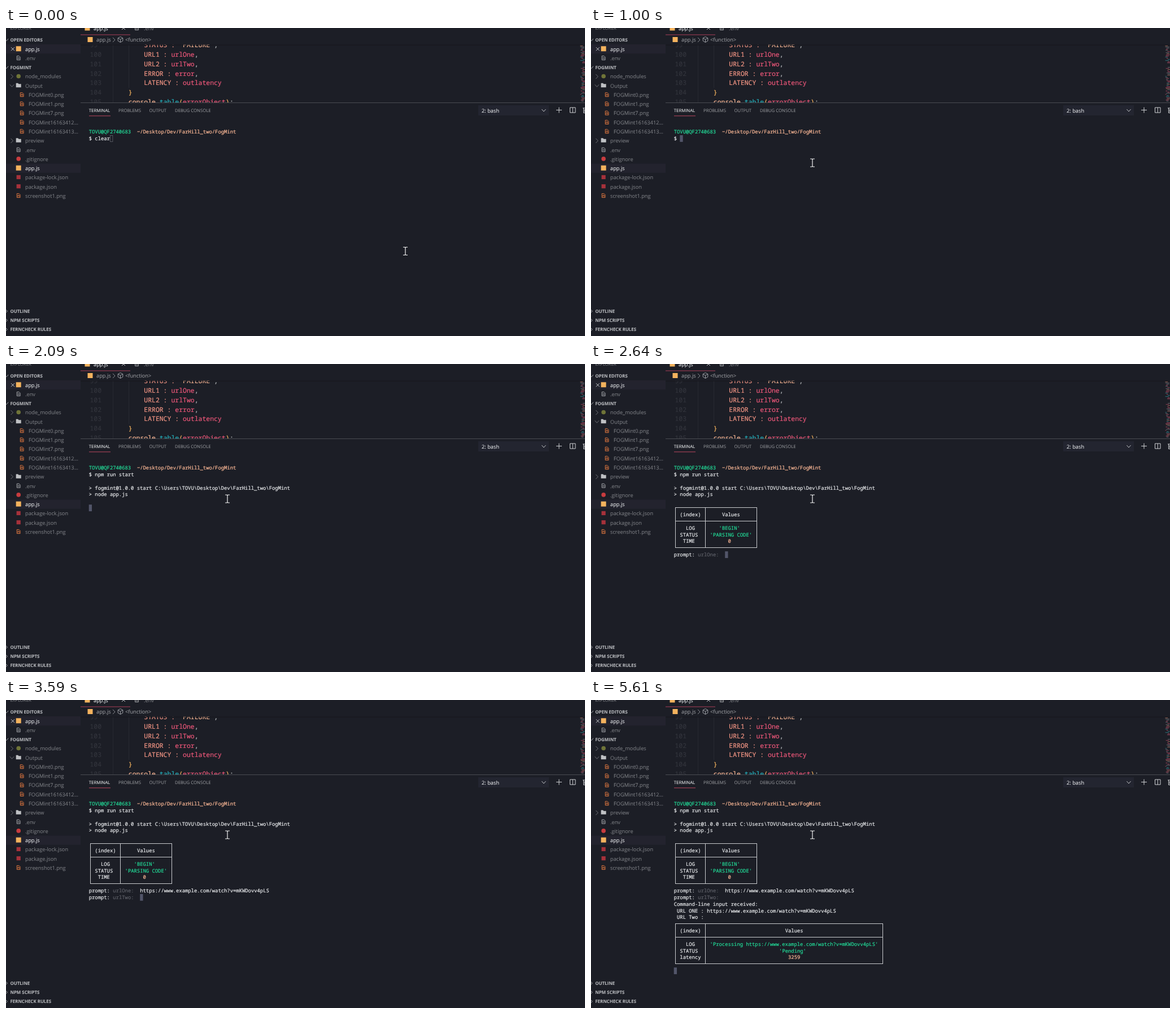
Recreate the animation shown at these times as an HTML page. Size 1025x546 px, loop 8000 ms.

```html
<!DOCTYPE html>
<html lang="en">
<head>
<meta charset="utf-8">
<title>Terminal session</title>
<style>
  html, body { margin: 0; width: 100%; height: 100%; overflow: hidden; background: #1c1e26; }
  svg { display: block; width: 100%; height: 100%; }
  text { white-space: pre; text-rendering: geometricPrecision; }
  .ui { font-family: "Open Sans", "Noto Sans", sans-serif; stroke-width: 0.1px; }
  .mono { font-family: "Noto Sans Mono", "DejaVu Sans Mono", monospace; stroke-width: 0.22px; }
</style>
</head>
<body>
<svg id="stage" viewBox="0 0 1025 546" preserveAspectRatio="none"></svg>
<script>
const LOOP = 8000;
const BG = '#1c1e26', TEXT = '#e6e8ea', DIM = '#7a7c81', TAB = '#8f9195', HEAD = '#b4b6ba';
const GREEN = '#22d896', PEACH = '#fab795', CORAL = '#f09483', RED = '#e95678';
const TEAL = '#25b0bc', GREY = '#5c5e66', AMBER = '#f4b35e';
const stage = document.getElementById('stage');

function add(tag, attrs, parent = stage) {
  const el = document.createElementNS('http://www.w3.org/2000/svg', tag);
  for (const key in attrs) el.setAttribute(key, attrs[key]);
  parent.appendChild(el);
  return el;
}
function rect(x, y, width, height, fill, parent) {
  return add('rect', { x, y, width, height, fill }, parent);
}
function stroke(d, color, width = 1, parent) {
  return add('path', { d, fill: 'none', stroke: color, 'stroke-width': width }, parent);
}
// A hairline outline in the fill colour gives the text its slightly heavier weight.
function write(cls, x, y, size, fill, content, parent, weight = 400) {
  const el = add('text', { class: cls, x, y, 'font-size': size, fill, stroke: fill, 'font-weight': weight }, parent);
  el.textContent = content;
  return el;
}
// Interface text, placed by the middle of its row.
const label = (x, y, content, fill = DIM) => write('ui', x, y + 3.4, 9.25, fill, content);
const heading = (x, y, content) => write('ui', x, y + 2.9, 7.9, HEAD, content, stage, 700);
const caps = (x, y, content, fill = TAB) => write('ui', x, y + 2.9, 7.75, fill, content);

const chevronRight = (x, y, color = HEAD) => stroke(`M${x - 2} ${y - 4}l4 4l-4 4`, color, 0.9);
const chevronDown = (x, y, color = HEAD) => stroke(`M${x - 3.6} ${y - 2}l3.6 4l3.6 -4`, color, 0.9);
const cross = (x, y) => stroke(`M${x - 3} ${y - 3}l6 6m0 -6l-6 6`, '#c9cbce', 1);
const sheet = (x, y, color) => stroke(`M${x - 2.9} ${y - 3.4}h3.8l2 2v5h-5.8z`, color, 1);

const icons = {
  script: (x, y) => rect(x - 4.5, y - 4.5, 9, 9, AMBER),
  pack: (x, y) => rect(x - 3.6, y - 3.6, 7.2, 7.2, '#a5313b'),
  ignore: (x, y) => add('circle', { cx: x, cy: y, r: 3.8, fill: '#c83c3f' }),
  modules: (x, y) => add('circle', { cx: x, cy: y, r: 3.8, fill: '#6f7438' }),
  folder: (x, y) => add('path', { d: `M${x - 4.5} ${y - 4}h3.6l1.2 1.4h4.2v6h-9z`, fill: '#bfc1c4' }),
  doc(x, y) {
    sheet(x, y, '#a5a7ab');
    stroke(`M${x - 1.8} ${y - 0.4}h3.6m-3.6 1.8h3.6`, '#a5a7ab', 0.8);
  },
  image(x, y) {
    sheet(x, y, '#d9743f');
    stroke(`M${x - 1.2} ${y + 2.4}v-3h2.4v3`, '#d9743f', 1);
  }
};

function drawSidebar() {
  const rowY = i => 21 + i * 16.26;
  for (const i of [1, 14]) rect(0, rowY(i) - 8.2, 132, 16.3, '#23232e');

  caps(7.5, 0.5, 'EXPLORER', DIM);
  heading(7.5, rowY(0), 'OPEN EDITORS');
  heading(7.5, rowY(3), 'FOGMINT');
  chevronDown(0.6, rowY(0));
  chevronDown(0.6, rowY(3));
  cross(12, rowY(1));

  const entries = [
    [1, 'script', 'app.js', TEXT], [2, 'doc', '.env'],
    [4, 'modules', 'node_modules'], [5, 'folder', 'Output'],
    [6, 'image', 'FOGMint0.png'], [7, 'image', 'FOGMint1.png'], [8, 'image', 'FOGMint7.png'],
    [9, 'image', 'FOGMint16163412...'], [10, 'image', 'FOGMint16163413...'],
    [11, 'folder', 'preview'], [12, 'doc', '.env'], [13, 'ignore', '.gitignore'],
    [14, 'script', 'app.js', TEXT], [15, 'pack', 'package-lock.json'],
    [16, 'pack', 'package.json'], [17, 'image', 'screenshot1.png']
  ];
  for (const [i, icon, name, color] of entries) {
    const indent = i >= 6 && i <= 10 ? 6 : 0;
    icons[icon](22.2 + indent, rowY(i) - 0.5);
    label(34 + indent, rowY(i), name, color);
  }
  chevronRight(10.5, rowY(4), DIM);
  chevronDown(10.5, rowY(5), DIM);
  chevronRight(10.5, rowY(11), DIM);

  ['OUTLINE', 'NPM SCRIPTS', 'FERNCHECK RULES'].forEach((name, i) => {
    heading(7.5, 502 + i * 16.2, name);
    chevronRight(0.4, 502 + i * 16.2);
  });
}

function drawMinimap() {
  let seed = 11;
  const random = () => (seed = (seed * 16807) % 2147483647) / 2147483647;
  const tones = ['#7b3a4d', '#80594f', '#56585f', '#8f4257', '#2b626b'];
  for (let y = 31; y < 130; y += 2) {
    if (y > 62 && y < 68) continue;
    const x = 1016.5 + random() * 4.5;
    rect(x, y, 2 + random() * 6, 1.2, tones[Math.floor(random() * tones.length)]);
  }
}

function drawEditor() {
  const advance = 6.88;
  const code = [
    [99, 4, ['STATUS : ', CORAL], ['"FAILURE"', PEACH], [',', HEAD]],
    [100, 4, ['URL1 : ', CORAL], ['urlOne', RED], [',', HEAD]],
    [101, 4, ['URL2 : ', CORAL], ['urlTwo', RED], [',', HEAD]],
    [102, 4, ['ERROR : ', CORAL], ['error', RED], [',', HEAD]],
    [103, 4, ['LATENCY : ', CORAL], ['outlatency', RED]],
    [104, 0, ['}', AMBER]],
    [105, 0, ['console', PEACH], ['.', HEAD], ['table', TEAL], ['(', AMBER], ['errorObject', RED], [')', AMBER], [';', HEAD]]
  ];
  rect(132, 29.5, 893, 103, BG, add('clipPath', { id: 'editor' }));
  const view = add('g', { 'clip-path': 'url(#editor)' });
  stroke('M189.5 29V133M217.5 29V106', '#272931', 1, view);
  for (const [number, indent, ...parts] of code) {
    const y = 51 + (number - 100) * 16.8;
    write('mono', 148.5, y, 11.45, '#32343c', number, view);
    let col = indent;
    for (const [content, color] of parts) {
      write('mono', 216.8 + col * advance, y, 11.45, color, content, view);
      col += content.length;
    }
  }
  drawMinimap();
  rect(132, 29.5, 893, 1.5, '#16161c').setAttribute('opacity', 0.6);

  icons.script(144, 0);
  label(155, 0.8, 'app.js', TEXT);
  cross(208, 0);
  icons.doc(231.5, 0);
  label(244, 0.8, '.env');
  rect(132, 11.5, 88, 1, '#a93f59');

  icons.script(149, 20.5);
  label(160, 21, 'app.js', '#96989c');
  chevronRight(191, 21, '#96989c');
  stroke('M202.5 15.5l4.3 2.4v5l-4.3 2.5l-4.3 -2.5v-5zM198.2 17.9l4.3 2.4l4.3 -2.4M202.5 20.3v5', '#a9abb0', 0.9);
  label(211, 21, '<function>', '#96989c');
}

function drawPanelHeader() {
  rect(132, 132, 893, 1, '#4a4c52');
  caps(146.8, 146, 'TERMINAL', TEXT);
  caps(199, 146, 'PROBLEMS');
  caps(253.5, 146, 'OUTPUT');
  caps(299, 146, 'DEBUG CONSOLE');
  rect(147, 155.3, 38, 1, '#b8455f');

  rect(836, 137, 125, 18, '#232530');
  label(842, 146.5, '2: bash', TEXT);
  chevronDown(952, 146, '#d0d2d5');
  stroke('M974 145.5h10m-5 -5v10', '#d0d2d5', 1);
  stroke('M998.5 141h9.5v9h-9.5zM1003.2 141v9', '#d0d2d5', 1);
  stroke('M1021 142h5M1022.5 142v8.5h4M1024.6 144v5', '#d0d2d5', 1);
}

const CELL = 5.325, ROW = 11.84, LEFT = 146.7, TOP = 178.2;
const colX = col => LEFT + col * CELL;
const rowTop = row => TOP + row * ROW;
const timed = [];

function show(el, from, to = LOOP) {
  timed.push({ el, from, to });
}
function print(row, col, content, color = TEXT, from = 0, to) {
  show(write('mono', colX(col), rowTop(row) + 8.9, 8.875, color, content), from, to);
}
function table(row, lastCol, from, cells) {
  const crisp = v => Math.floor(v) + 0.5;
  const midY = r => crisp(rowTop(r + 0.5) - 0.3);
  const midX = col => crisp(colX(col + 0.5));
  const across = [0, 2, 6].map(r => `M${midX(0) - 0.5} ${midY(row + r)}H${midX(lastCol) + 0.5}`);
  const down = [0, 10, lastCol].map(col => `M${midX(col)} ${midY(row)}V${midY(row + 6)}`);
  show(stroke(across.concat(down).join(''), '#c9cbce'), from);
  for (const [offset, col, content, color] of cells) print(row + offset, col, content, color, from);
}

function drawTerminal() {
  const url = 'https://www.example.com/watch?v=mKWDovv4pLS';
  print(0, 0, 'TOVU@QF2740683', GREEN);
  print(0, 16, '~/Desktop/Dev/FarHill_two/FogMint', PEACH);
  print(1, 0, '$');
  print(1, 2, 'clear', TEXT, 0, 1000);
  print(1, 2, 'npm run start', TEXT, 1090);
  print(3, 0, '> fogmint@1.0.0 start C:\\Users\\TOVU\\Desktop\\Dev\\FarHill_two\\FogMint', TEXT, 2090);
  print(4, 0, '> node app.js', TEXT, 2090);
  table(6, 27, 2340, [
    [1, 2, '(index)'], [1, 16, 'Values'],
    [3, 4, 'LOG'], [3, 15, "'BEGIN'", GREEN],
    [4, 2, 'STATUS'], [4, 12, "'PARSING CODE'", GREEN],
    [5, 3, 'TIME'], [5, 18, '0', PEACH]
  ]);
  print(13, 0, 'prompt:', TEXT, 2640);
  print(13, 8, 'urlOne:', GREY, 2640);
  print(13, 17, url, TEXT, 3120);
  print(14, 0, 'prompt:', TEXT, 3590);
  print(14, 8, 'urlTwo:', GREY, 3590);
  print(15, 0, 'Command-line input received:', TEXT, 5080);
  print(16, 1, 'URL ONE : ' + url, TEXT, 5080);
  print(17, 1, 'URL Two :', TEXT, 5080);
  table(18, 69, 5610, [
    [1, 2, '(index)'], [1, 37, 'Values'],
    [3, 4, 'LOG'], [3, 12, `'Processing ${url}'`, GREEN],
    [4, 2, 'STATUS'], [4, 35, "'Pending'", GREEN],
    [5, 2, 'latency'], [5, 38, '3259', PEACH]
  ]);
}

// [time, row, column]
const caretSteps = [
  [0, 1, 7], [1000, 1, 2], [1090, 1, 15], [1540, 2, 0], [2090, 6, 0], [2340, 13, 0], [2640, 13, 17],
  [3120, 13, 60], [3500, 14, 0], [3590, 14, 17], [5080, 18, 0], [5610, 25, 0]
];
// [time, x, y]
const pointerSteps = [[0, 707, 395.5], [70, 500, 291], [130, 396, 241], [300, 392, 239]];
const FOCUS_TIME = 300;
const latest = (steps, t) => steps.filter(step => step[0] <= t).pop();

drawSidebar();
drawEditor();
drawPanelHeader();
const caret = add('rect', { 'stroke-width': 0.8 });
drawTerminal();
const pointer = stroke('M-4 -7h3l1 1l1 -1h3M0 -6V6M-4 7h3l1 -1l1 1h3', '#f2f2f2', 1.2);

function render(t) {
  for (const { el, from, to } of timed) {
    el.setAttribute('visibility', t >= from && t < to ? 'visible' : 'hidden');
  }
  const [, row, col] = latest(caretSteps, t);
  const focused = t >= FOCUS_TIME, inset = focused ? 0 : 0.4;
  caret.setAttribute('x', colX(col) + inset);
  caret.setAttribute('y', rowTop(row) + inset);
  caret.setAttribute('width', CELL - 2 * inset);
  caret.setAttribute('height', ROW - 2 * inset);
  caret.setAttribute('fill', focused ? '#525569' : 'none');
  caret.setAttribute('stroke', focused ? 'none' : '#60626b');
  const [, x, y] = latest(pointerSteps, t);
  pointer.setAttribute('transform', `translate(${x} ${y})`);
}

const start = performance.now();
function tick() {
  render((performance.now() - start) % LOOP);
  requestAnimationFrame(tick);
}
tick();
</script>
</body>
</html>
```
